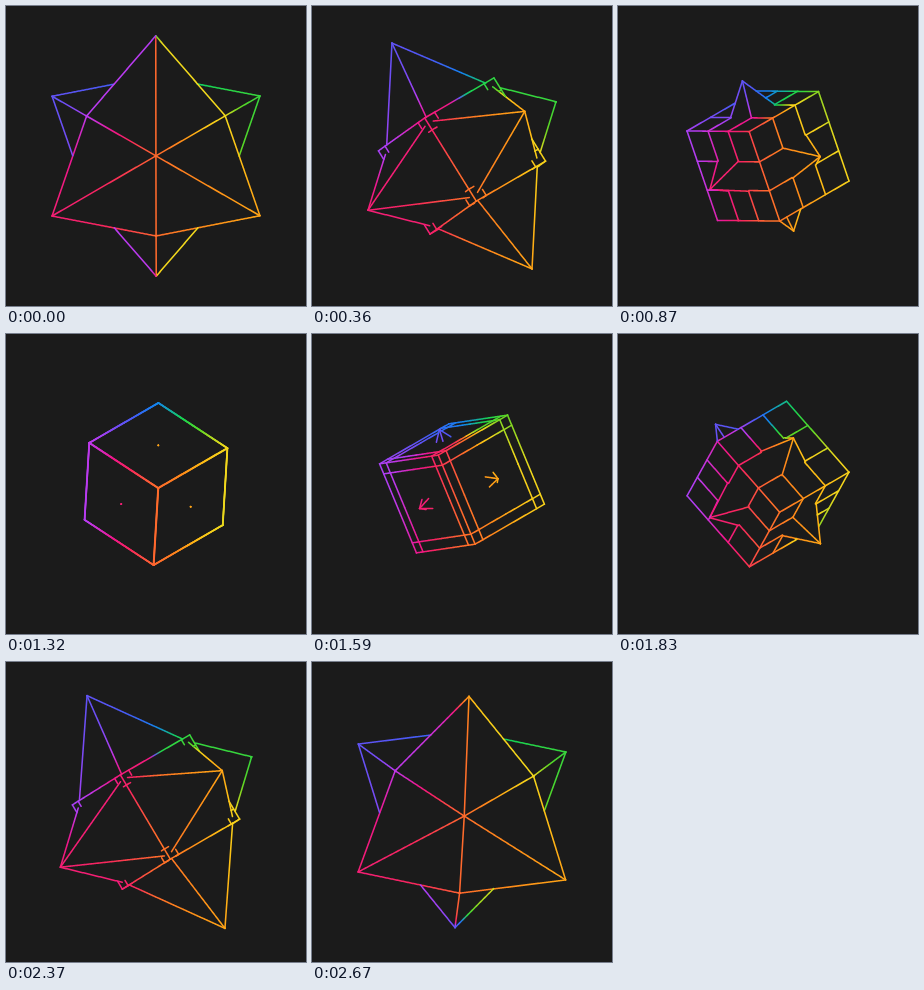
Animation, 300 px wide and 300 px high, one loop 2.7 s. Source, as an HTML page with a canvas:

```html
<!DOCTYPE html>
<html lang="en">
<head>
<meta charset="utf-8">
<title>Spiked cube</title>
<style>
  html, body { margin: 0; width: 100%; height: 100%; overflow: hidden; background: #1b1b1b; }
  canvas { display: block; width: 300px; height: 300px; }
</style>
</head>
<body>
<canvas id="stage" width="300" height="300"></canvas>
<script>
const ctx = document.getElementById('stage').getContext('2d');
const LOOP = 2700;
const SIDE = 98;
const DEPTH_SLACK = 0.8;

// Isometric axes: x right, y down, z away from the viewer.
const R2 = Math.SQRT1_2, R3 = 1 / Math.sqrt(3), R6 = 1 / Math.sqrt(6);
const RIGHT = [R2, -R6, R3];
const LEFT = [-R2, -R6, R3];
const DOWN = [0, 2 * R6, R3];

// Colours around the upright axis, starting at the front and going right.
const WHEEL = [
  [255, 106, 44], [255, 140, 24], [255, 188, 20], [242, 216, 28],
  [90, 215, 36], [20, 212, 84], [18, 130, 240], [72, 90, 245],
  [120, 75, 245], [186, 58, 240], [240, 22, 140], [248, 38, 92]
];

const mix = (a, b, t) => a.map((v, i) => v + (b[i] - v) * t);

function colorAt([x, y, z]) {
  const turn = Math.atan2(x, y * R3 - z * 2 * R6) / (2 * Math.PI);
  const count = WHEEL.length;
  const pos = (turn + 1) % 1 * count;
  const i = Math.floor(pos);
  const rgb = mix(WHEEL[i % count], WHEEL[(i + 1) % count], pos - i);
  return `rgb(${rgb.map(Math.round).join(',')})`;
}

function bodyAxes(angle) {
  const c = Math.cos(angle), s = Math.sin(angle);
  return [
    RIGHT,
    LEFT.map((v, i) => c * v + s * DOWN[i]),
    DOWN.map((v, i) => c * v - s * LEFT[i])
  ];
}

function buildSolid(angle, h) {
  const axes = bodyAxes(angle);
  const place = p => [0, 1, 2].map(i =>
    SIDE * (p[0] * axes[0][i] + p[1] * axes[1][i] + p[2] * axes[2][i]));
  const lines = [], triangles = [];
  const inset = (1 - h) / 2;
  // Grid lines cross the whole face unless the spike stands in their way.
  const reach = h > inset ? inset : 0.5;

  for (let axis = 0; axis < 3; axis++) {
    const j = (axis + 1) % 3, k = (axis + 2) % 3;

    for (const side of [-1, 1]) {
      const at = (a, b, rise = 0) => {
        const p = [];
        p[axis] = side * (0.5 + rise);
        p[j] = a - 0.5;
        p[k] = b - 0.5;
        return place(p);
      };
      const square = m => [at(m, m), at(1 - m, m), at(1 - m, 1 - m), at(m, 1 - m)];

      const [c0, c1, c2, c3] = square(0);
      triangles.push([c0, c1, c2], [c0, c2, c3]);

      const tip = at(0.5, 0.5, h);
      const base = square(inset);
      base.forEach((p, i) => {
        triangles.push([tip, p, base[(i + 1) % 4]]);
        lines.push([tip, p]);
      });

      for (const u of [h, 1 - h]) {
        lines.push(
          [at(u, 0), at(u, reach)], [at(u, 1), at(u, 1 - reach)],
          [at(0, u), at(reach, u)], [at(1, u), at(1 - reach, u)]);
      }

      // Each axis contributes its four parallel cube edges, two per side.
      for (const b of [-0.5, 0.5]) {
        const ends = [-0.5, 0.5].map(v => {
          const p = [];
          p[axis] = v;
          p[j] = side / 2;
          p[k] = b;
          return place(p);
        });
        lines.push(ends);
      }
    }
  }
  return { lines, triangles };
}

function isHidden([x, y, z], triangles) {
  return triangles.some(([a, b, c]) => {
    const det = (b[1] - c[1]) * (a[0] - c[0]) + (c[0] - b[0]) * (a[1] - c[1]);
    if (Math.abs(det) < 1e-6) return false;
    const u = ((b[1] - c[1]) * (x - c[0]) + (c[0] - b[0]) * (y - c[1])) / det;
    const v = ((c[1] - a[1]) * (x - c[0]) + (a[0] - c[0]) * (y - c[1])) / det;
    const w = 1 - u - v;
    return u >= 0 && v >= 0 && w >= 0 &&
      u * a[2] + v * b[2] + w * c[2] < z - DEPTH_SLACK;
  });
}

function drawLine([a, b], triangles) {
  const length = Math.hypot(b[0] - a[0], b[1] - a[1]);
  if (length < 1e-4) return;
  const steps = Math.max(1, Math.ceil(length));

  const gradient = ctx.createLinearGradient(a[0], a[1], b[0], b[1]);
  for (let i = 0; i <= 12; i++) {
    // Stay off the exact ends, where the hue may be undefined on the axis.
    const t = Math.min(0.99, Math.max(0.01, i / 12));
    gradient.addColorStop(i / 12, colorAt(mix(a, b, t)));
  }
  ctx.strokeStyle = gradient;

  ctx.beginPath();
  let open = false;
  for (let i = 0; i < steps; i++) {
    const visible = !isHidden(mix(a, b, (i + 0.5) / steps), triangles);
    if (visible) {
      const from = mix(a, b, i / steps), to = mix(a, b, (i + 1) / steps);
      if (!open) ctx.moveTo(from[0], from[1]);
      ctx.lineTo(to[0], to[1]);
    }
    open = visible;
  }
  ctx.stroke();
}

function render(time) {
  const phase = time % LOOP / LOOP;
  const height = Math.abs(Math.cos(Math.PI * phase)) ** 1.7;
  const { lines, triangles } = buildSolid(2 * Math.PI * phase, Math.max(height, 0.002));

  ctx.setTransform(1, 0, 0, 1, 0, 0);
  ctx.fillStyle = '#1b1b1b';
  ctx.fillRect(0, 0, 300, 300);
  ctx.translate(150, 150);
  ctx.lineWidth = 1.55;
  ctx.lineCap = ctx.lineJoin = 'round';
  lines.forEach(line => drawLine(line, triangles));
}

const start = performance.now();
function tick() {
  render(performance.now() - start);
  requestAnimationFrame(tick);
}
tick();
</script>
</body>
</html>
```
